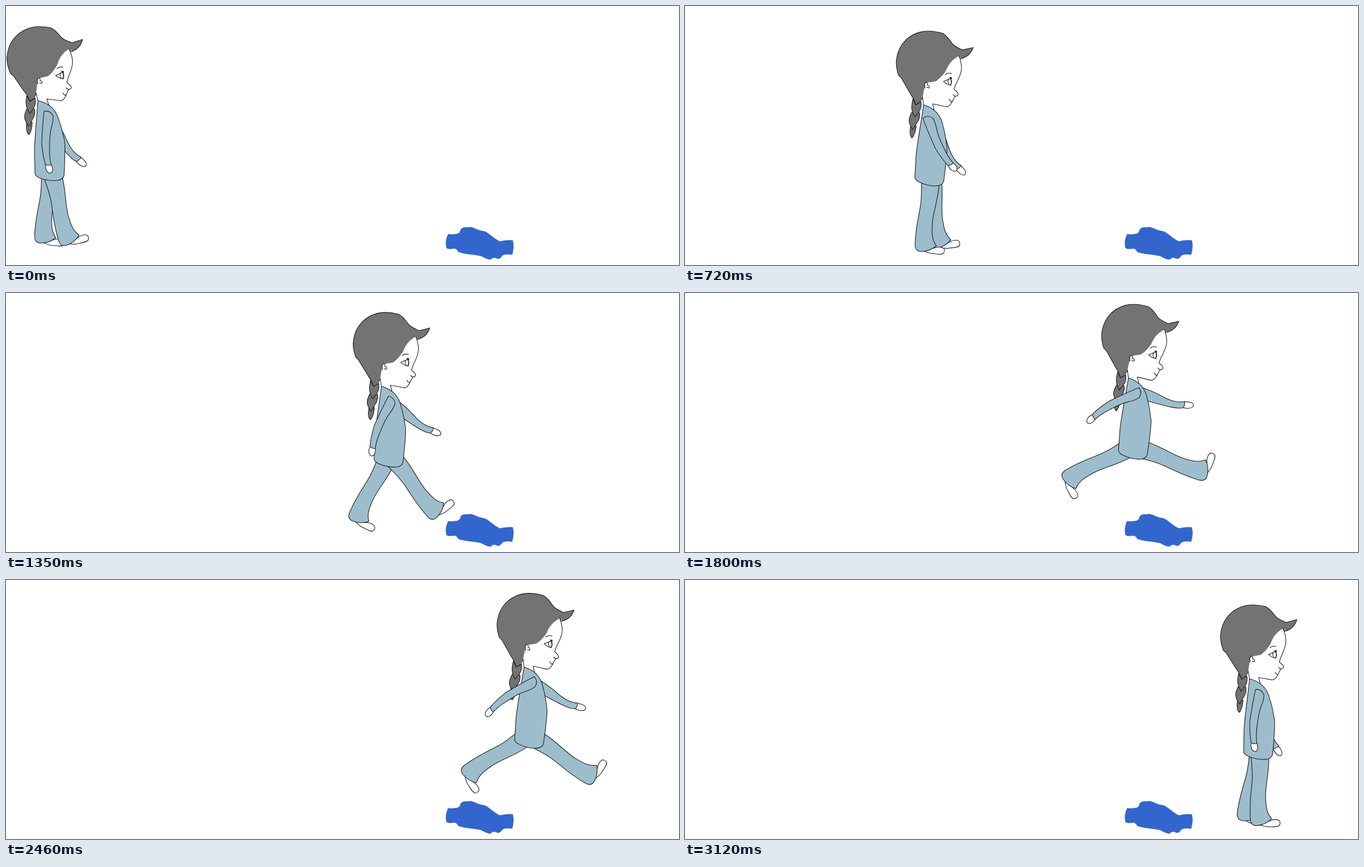
These frames come from a looping animation (1205 px wide and 465 px high, 3.15 s). An HTML page:

```html
<!DOCTYPE html>
<html lang="en">
<head>
<meta charset="utf-8">
<title>Jump over the puddle</title>
<style>
  html, body { margin: 0; width: 100%; height: 100%; overflow: hidden; background: #fff; }
  svg { display: block; }
  .line { fill: none; }
  .skin { fill: #fff; }
  .cloth { fill: #9dbdcc; }
  .hair { fill: #737373; }
  #puddle { fill: #3366cc; stroke: #3366cc; stroke-width: 1.2; }
  #girl { stroke: #1c1c1c; stroke-width: 1.1; stroke-linejoin: round; stroke-linecap: round; }
</style>
</head>
<body>
<svg width="1205" height="465" viewBox="0 0 1205 465">
  <defs>
    <g id="leg">
      <path class="skin" d="M-8 134 Q5 141 14 140.5 C22 141 31 142 32 138 Q35 130 28 128.5 Q20 127 15 130Z"/>
      <path class="cloth" d="M-15 2 C-13 22 -12 42 -14 58 C-17 82 -21 102 -20 127 Q-19 137 -10 137.5 C0 137 9 135 18 126 C8 114 9 98 9 86 C10 62 17 46 18 15 L17 2Z"/>
    </g>
  </defs>

  <path id="puddle" d="M792 410 Q786 422 789 434 Q792 437 803 435 Q808 436 810 441 C820 446 842 445 852 449 Q860 454 867 455 Q872 450 877 452 Q884 456 888 448 Q893 444 906 446 Q910 432 907 421 Q897 420 884 423 C870 417 862 404 852 404 C842 403 836 395 826 398 Q816 397 814 403 Q813 410 803 410 Q797 411 792 410Z"/>

  <g id="girl">
    <g id="farArm">
      <path class="skin" d="M-5 100 C-7 108 -4 117 1 118 C7 117 7 108 5 100Z"/>
      <path class="cloth" d="M20 14 C19 35 11 55 7 66 C3 80 2 90 6 101 Q0 103 -5.5 100.5 C-10 90 -7 68 -3 36 L0 14Z"/>
    </g>
    <use id="farLeg" href="#leg"/>
    <use id="nearLeg" href="#leg"/>

    <g id="head">
      <path class="skin" stroke="none" d="M113 77 C117 86 120 95 119 104 C117 119 110 128 109 138 C112 140 117 142 117 147 Q115 151 111 150 L107 161 Q103 171 96 170 L73 167 L77 179 L57 171 L54 155 L60 125Z"/>
      <path class="line" d="M113 77 C117 86 120 95 119 104 C117 119 110 128 109 138 C112 140 117 142 117 147 Q115 151 110 149 M112 150 L107 161 Q103 171 96 170 Q85 168 73 167 L77 179 M54 156 L57 170"/>
      <path class="hair" d="M37 210 C36 220 37 228 41 231 Q46 226 47 209Z"/>
      <path class="hair" d="M37 185 C32 197 31 203 41 216 C45 211 46 205 49 201 Q53 193 51 185Z"/>
      <path class="hair" d="M37 161 C35 174 35 182 43 193 C47 186 55 181 52 165 L43 171Z"/>
      <path class="hair" stroke="none" d="M8 121 C2 107 1 99 2 90 C4 66 18 49 38 41 C50 36 64 36 80 39 C92 45 95 53 101 58 C107 62 113 64 118 66 Q128 63 137 60 Q134 74 119 82 L113 77 C100 85 95 95 92 105 C88 113 81 122 75 126 Q67 128 58 130 Q55 142 54 156 Q50 167 43 171 Q39 161 33 154 L13 125Z"/>
      <path class="line" d="M113 77 L116 82 Q133 77 137 60 Q128 63 118 66 C113 64 107 62 101 58 C95 53 92 45 80 39 C64 36 50 36 38 41 C18 49 4 66 2 90 C1 99 2 107 8 121 L13 125 L33 154 Q39 161 43 171 Q50 168 54 157"/>
      <path class="skin" d="M57 140 C55 134 56 129 59 129 Q62 131 61 134 Q66 135 64 139 L60 138"/>
      <path class="line" d="M91 113 Q95 108 102 110 M103 117 Q96 122 89 125 Q95 130 103 131 M98 120 Q95 125 99 129 M102 156 Q104 161 108 160 M108 147 L110 149"/>
      <path class="line" stroke-width="1.7" d="M101 119 Q105 125 102 130 M100 117 L103 119"/>
    </g>

    <path class="cloth" d="M57 170 C56 192 51 240 51 262 L52 301 Q53 306 61 309 C73 314 86 314 92 313 Q102 312 104 304 C105 285 106 257 105 243 C102 229 98 213 95 206 C91 190 81 175 57 170Z"/>

    <g id="nearArm">
      <path class="skin" d="M-5 89 C-6 97 -2 104 3 104 C8 103 9 97 5 89Z"/>
      <path class="cloth" d="M-8 -7 C-9 2 -11 24 -12 52 C-10 68 -9 80 -5 89 Q0 91 5 89 C1 75 2 65 2 57 C2 40 3 31 5 23 C8 13 9 8 8 1 Q3 -9 -8 -7Z"/>
    </g>
  </g>
</svg>

<script>
const LOOP = 3150, STEP = 30, BEAT = LOOP / 6;
const APEX = 3.95; // beat at the top of the jump

// Limb angles are degrees from vertical, forward positive.
const poses = [
  { beat: 0,    lean: 0,   nearLeg: 16,  farLeg: -3,  nearArm: 0,   farArm: 44 }, // stand
  { beat: 1,    lean: 6.2, nearLeg: -16, farLeg: 14,  nearArm: 39,  farArm: 31 }, // step
  { beat: 2,    lean: 2.2, nearLeg: 20,  farLeg: 0,   nearArm: 5,   farArm: 50 }, // push off
  { beat: APEX, lean: 6.8, nearLeg: 92,  farLeg: -82, nearArm: -86, farArm: 93 }, // leap
  { beat: 6,    lean: 2.3, nearLeg: 0,   farLeg: -6,  nearArm: -4,  farArm: 25 }  // land
];

// Distance walked by each beat.
const stops = [0, 283, 518, 688, 802, 902, 957];

const part = id => document.getElementById(id);
const mix = (a, b, k) => a + (b - a) * k;

function poseAt(beat) {
  const next = poses.findIndex(p => p.beat > beat);
  const a = poses[next - 1], b = poses[next];
  const k = (beat - a.beat) / (b.beat - a.beat);
  return Object.fromEntries(Object.keys(a).map(key => [key, mix(a[key], b[key], k)]));
}

function draw(t) {
  const beat = t / BEAT, i = Math.floor(beat);
  const pose = poseAt(beat);
  const leap = Math.max(0, 1 - Math.abs(beat - APEX) / 1.95);
  const x = mix(stops[i], stops[i + 1], beat - i);
  const y = Math.min(7.5, 8 * beat) - 34 * leap;

  part('girl').setAttribute('transform',
    `translate(${x} ${y}) rotate(${pose.lean} 57 170)`);

  const swing = (id, px, py) => part(id).setAttribute('transform',
    `translate(${px} ${py}) rotate(${-pose[id] - pose.lean})`);
  swing('farArm', 60, 203);
  swing('farLeg', 78 + 0.05 * pose.farLeg, 289);
  swing('nearLeg', 78 + 0.05 * pose.nearLeg, 295);
  swing('nearArm', 76 - 0.3 * Math.max(0, pose.nearArm), 196);
}

const start = performance.now();
function tick() {
  const t = (performance.now() - start) % LOOP;
  draw(Math.floor(t / STEP) * STEP);
  requestAnimationFrame(tick);
}
draw(0);
requestAnimationFrame(tick);
</script>
</body>
</html>
```
